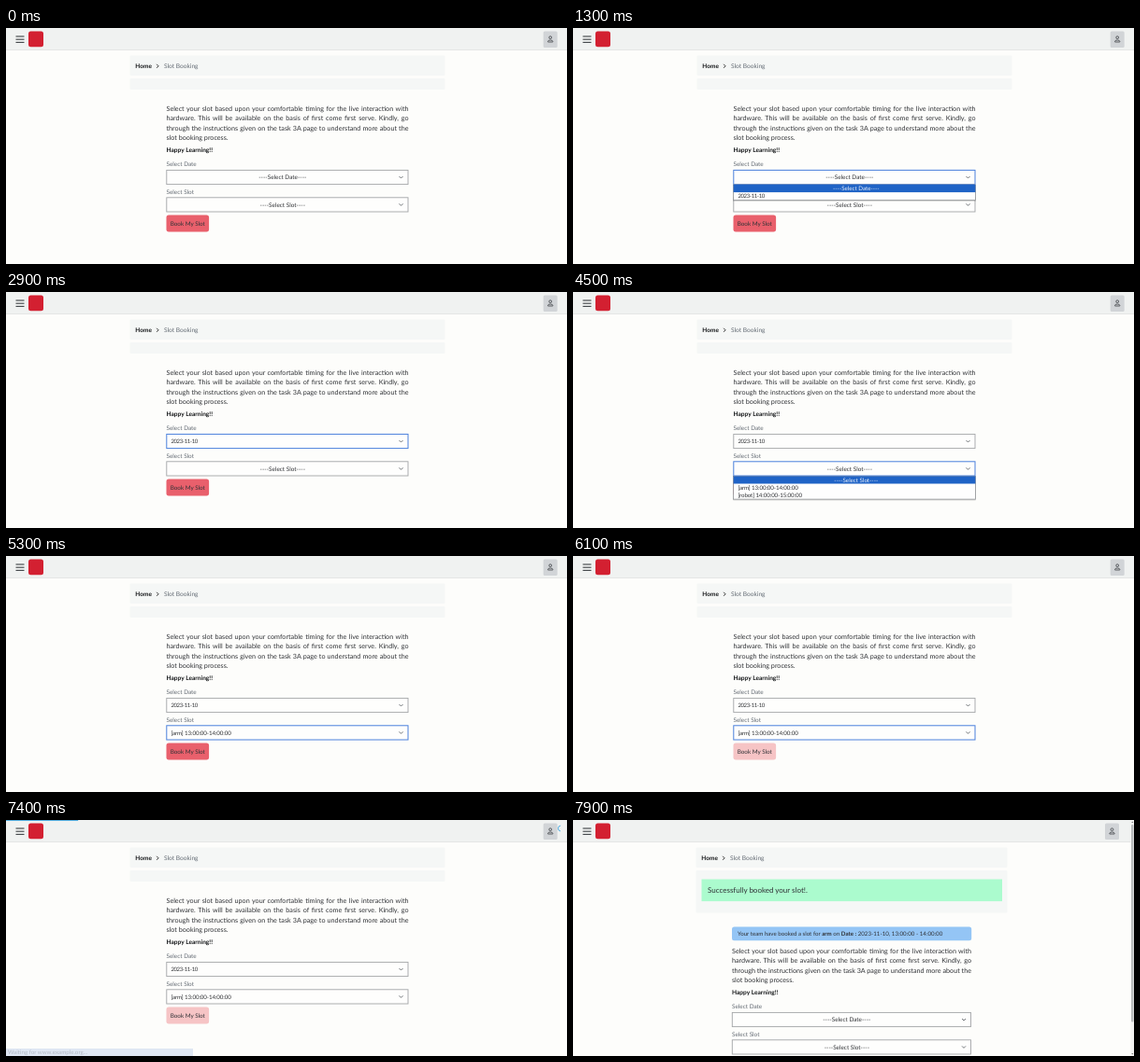
These frames come from a looping animation (600x253 px, 8000 ms). An HTML page:

```html
<!DOCTYPE html>
<html lang="en">
<head>
<meta charset="utf-8">
<title>Slot Booking</title>
<style>
  html, body { margin: 0; width: 100%; height: 100%; overflow: hidden; background: #fdfdfb; }
  svg { display: block; width: 600px; height: 253px; }
  text { font-family: Lato, sans-serif; text-rendering: geometricPrecision; white-space: pre; }
</style>
</head>
<body>
<svg id="stage" viewBox="0 0 600 253" xmlns="http://www.w3.org/2000/svg"></svg>
<script>
const LOOP = 8000;
const INK = '#303236', SOFT = '#646b74', BLUE = '#4a80dc', GREY = '#a3a5a7';
const TIME = { size: 6.2, gap: -0.12 }, DAY = { size: 6, gap: -0.38 };
const stage = document.getElementById('stage');

function set(el, attrs) {
  for (const k in attrs) el.setAttribute(k, attrs[k]);
  return el;
}
function add(parent, tag, attrs = {}) {
  return parent.appendChild(set(document.createElementNS(stage.namespaceURI, tag), attrs));
}
const group = parent => add(parent, 'g');
function rect(parent, x, y, w, h, fill, r = 0) {
  return add(parent, 'rect', { x, y, width: w, height: h, fill, rx: r });
}
function line(parent, d, stroke, width) {
  return add(parent, 'path', { d, stroke, 'stroke-width': width, fill: 'none' });
}
// y is the middle of the capitals
function label(parent, str, x, y, o = {}) {
  const { size = 6.4, fill = INK, weight = 400, anchor = 'start', gap = 0 } = o;
  const el = add(parent, 'text', {
    x, y: y + size * 0.36, fill, 'font-size': size, 'font-weight': weight,
    'text-anchor': anchor, 'letter-spacing': gap
  });
  el.textContent = str;
  return el;
}
function justify(el, width) {
  const gaps = el.textContent.split(' ').length - 1;
  el.setAttribute('word-spacing', (width - el.getComputedTextLength()) / gaps);
}
function show(el, on) {
  el.setAttribute('display', on ? 'inline' : 'none');
}
const clamp = v => Math.max(0, Math.min(1, v));

const LINES = [
  'Select your slot based upon your comfortable timing for the live interaction with',
  'hardware. This will be available on the basis of first come first serve. Kindly, go',
  'through the instructions given on the task 3A page to understand more about the',
  'slot booking process.'
];

function select(parent, x, y, w, prompt) {
  const box = add(parent, 'rect', {
    x: x + 0.3, y: y + 0.4, width: w - 0.8, height: 15.2, fill: '#fefefd', stroke: GREY, 'stroke-width': 0.9
  });
  const hint = label(parent, prompt, x + w * 0.48, y + 7.9, { anchor: 'middle' });
  line(parent, `M${x + w - 10} ${y + 7}l2 2l2 -2`, '#63676b', 0.9);
  return { box, hint };
}

function page(dx, width, dy, barEnd) {
  const g = group(stage);
  const x = 171.5 + dx, left = 132.5 + dx / 1.5;
  rect(g, 0, 0, barEnd, 23.4, '#f0f2f1');
  rect(g, 0, 23.2, barEnd, 0.8, '#e0e2e2');
  for (const y of [9, 12.2, 15.4]) line(g, `M10.5 ${y}h9`, '#3d4144', 1.1);
  rect(g, 24, 3.6, 16, 16.6, '#d32031', 2.5);
  const ux = barEnd === 600 ? 574.7 : 569;
  rect(g, ux, 3.4, 15, 17.6, '#d1d4d7', 1.5);
  add(g, 'circle', { cx: ux + 7.5, cy: 10.2, r: 1.4, fill: 'none', stroke: '#3d4144', 'stroke-width': 0.8 });
  line(g, `M${ux + 4.9} 15v-.6q0-1.4 2.6-1.4t2.6 1.4v.6z`, '#3d4144', 0.8);

  const pw = width + 78 - (dx ? 1 : 0);
  rect(g, left, 29.5, pw, 21.6, '#f5f7f6', 1);
  rect(g, left, 54, pw, dy ? 45.5 : 12, '#f5f7f6', 1);
  label(g, 'Home', left + 5.8, 40.8, { weight: 700, size: 6.5, fill: '#17191b' });
  line(g, `M${left + 28.6} 38.8l2 2l-2 2`, '#222', 0.9);
  label(g, 'Slot Booking', left + 36.5, 40.8, { size: 6.6, fill: SOFT });

  LINES.forEach((s, i) => {
    const el = label(g, s, x, 86.2 + dy + i * 10.5, { size: 7.2 });
    if (i < 3) justify(el, width);
  });
  label(g, 'Happy Learning!!', x, 131 + dy, { weight: 700, size: 6.6, fill: '#17191b' });
  label(g, 'Select Date', x, 145.9 + dy, { fill: SOFT });
  label(g, 'Select Slot', x, 175.3 + dy, { fill: SOFT });
  const date = select(g, x, 152 + dy, width, '----Select Date----');
  const slot = select(g, x, 181.4 + dy, width, '----Select Slot----');
  const button = rect(g, x, 200.4 + dy, 45.6, 18, '#e9606c', 2.6);
  label(g, 'Book My Slot', x + 22.8, 209.3 + dy, { size: 6.3, anchor: 'middle' });
  return { g, date, slot, button };
}

function menu(parent, y, items, style) {
  const g = group(parent), row = 8.1, h = items.length * row + 0.4;
  rect(g, 171, y + 0.8, 260, h + 0.6, '#00000026', 1);
  add(g, 'rect', { x: 171.6, y, width: 258.8, height: h, fill: '#fefefe', stroke: '#85888c', 'stroke-width': 0.7 });
  const mark = rect(g, 171.6, y, 258.8, row, '#1f63c6');
  const texts = items.map((s, i) => i
    ? label(g, s, 176.4, y + (i + 0.5) * row, style)
    : label(g, s, 302.8, y + row / 2, { size: 6.2, anchor: 'middle' }));
  return (open, pick) => {
    show(g, open);
    mark.setAttribute('y', y + pick * row);
    texts.forEach((el, i) => el.setAttribute('fill', i === pick ? '#eef3fb' : INK));
  };
}

const form = page(0, 259, 0, 600);
const dateValue = label(form.g, '2023-11-10', 176.4, 159.9, DAY);
const slotValue = label(form.g, '[arm] 13:00:00-14:00:00', 176.4, 189.3, TIME);
const dateMenu = menu(form.g, 168, ['----Select Date----', '2023-11-10'], DAY);
const slotMenu = menu(form.g, 197.4, ['----Select Slot----', '[arm] 13:00:00-14:00:00', '[robot] 14:00:00-15:00:00'], TIME);

const status = group(form.g);
rect(status, 0, 245, 200, 8, '#dfe7f3');
label(status, 'Waiting for www.example.org...', 2, 249.2, { size: 6.2, fill: '#b3bac5' });

const loader = group(form.g);
const bar = rect(loader, 0, 0, 0, 0.9, '#45a8e0');
const spinner = line(loader, 'M-2.1 2.1A3 3 0 0 1 2.1 -2.1', '#45a8e0', 0.9);

const done = page(-1.5, 256, 54, 596.4);
rect(done.g, 137.5, 63.5, 321.5, 23.6, '#abfbce');
label(done.g, 'Successfully booked your slot!.', 144, 75.5, { size: 8 });
rect(done.g, 170, 114.4, 256.2, 14.8, '#94c5f5', 2.5);
const note = label(done.g, '', 176, 122, { size: 6.17 });
[['Your team have booked a slot for '], ['arm', 700], [' on '], ['Date :', 700],
 [' 2023-11-10, 13:00:00 - 14:00:00']].forEach(([s, w = 400]) => {
  add(note, 'tspan', { 'font-weight': w }).textContent = s;
});
rect(done.g, 596.4, 0, 3.6, 253, '#f3f3f2');
rect(done.g, 597, 5, 2.5, 211.5, '#b9bbbc', 1);
add(done.g, 'path', { d: 'M597.2 3l1.1-1.6l1.1 1.6zM597.2 250l1.1 1.6l1.1-1.6z', fill: '#777' });

function focus(box, on) {
  set(box, { stroke: on ? BLUE : GREY, 'stroke-width': on ? 1 : 0.9 });
}

function render(t) {
  const within = (a, b) => t >= a && t < b;
  const booked = t >= 7600;
  show(form.g, !booked);
  show(done.g, booked);

  focus(form.date.box, within(1200, 3900));
  focus(form.slot.box, within(3900, 6700));
  show(form.date.hint, t < 2600);
  show(dateValue, t >= 2600);
  show(form.slot.hint, t < 5300);
  show(slotValue, t >= 5300);
  dateMenu(within(1200, 2600), t < 1700 ? 0 : 1);
  slotMenu(within(3900, 5300), t < 4700 ? 0 : 1);
  form.button.setAttribute('fill', t < 6100 ? '#e9606c' : '#f6c4c5');

  show(status, t >= 6700);
  status.setAttribute('opacity', clamp((t - 6600) / 300));

  show(loader, t >= 7100);
  const start = clamp((t - 7050) / 150);
  const trickle = Math.max(0, t - 7200) / 400;
  bar.setAttribute('width', 47 * (1 - (1 - start) ** 2) + 60 * trickle);
  spinner.setAttribute('transform', `translate(593.1 9) rotate(${(t - 7050) * 0.9})`);
}

const begin = performance.now();
function tick() {
  render((performance.now() - begin) % LOOP);
  requestAnimationFrame(tick);
}
tick();
</script>
</body>
</html>
```
